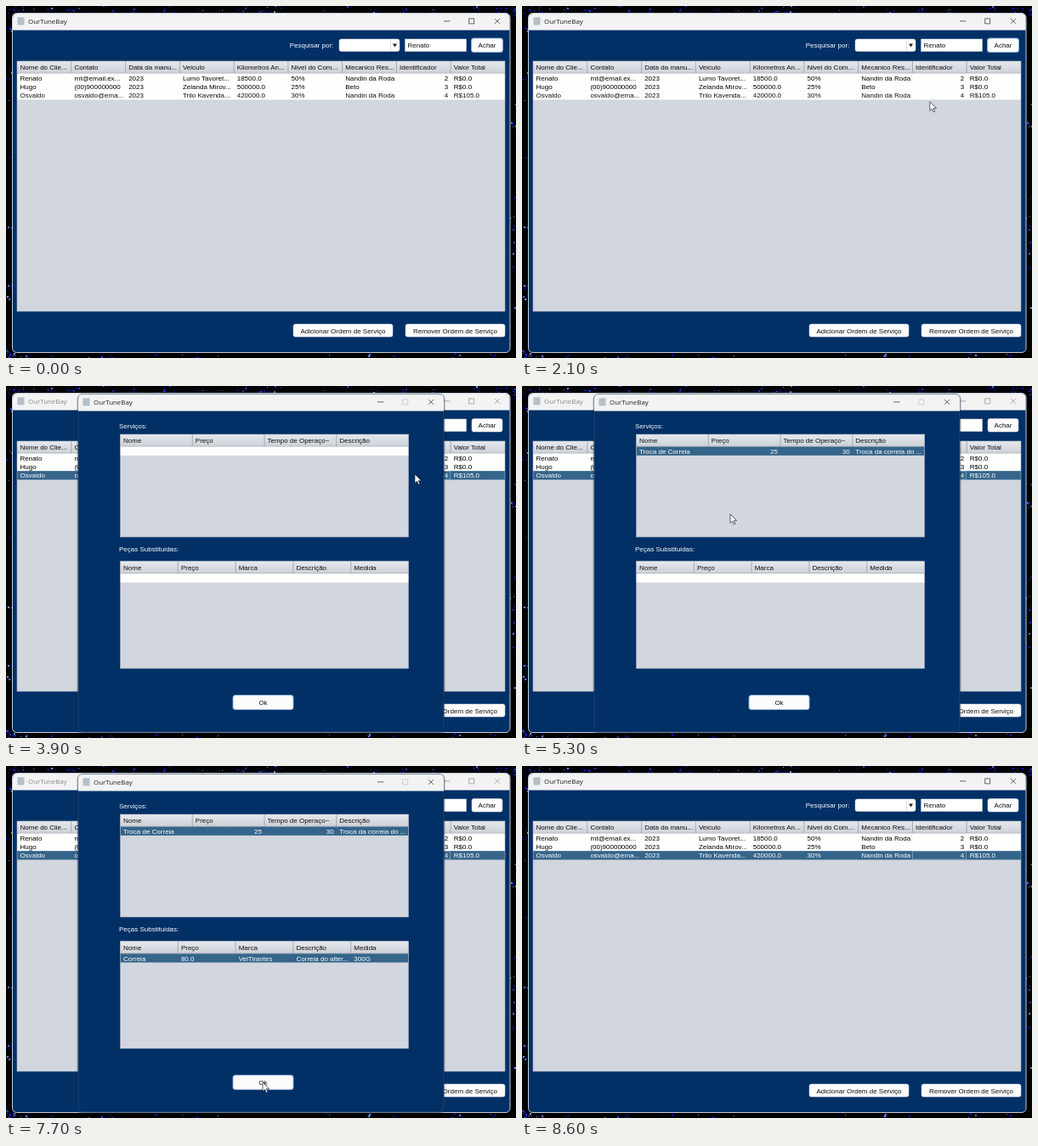
An HTML page that plays this animation: 600 by 415 pixels, repeating every 8700 ms.

```html
<!DOCTYPE html>
<html lang="pt">
<head>
<meta charset="utf-8">
<style>
html, body { margin: 0; width: 100%; height: 100%; overflow: hidden; background: #000; }
svg { display: block; width: 100vw; height: 100vh; }
text { font: 8px "Liberation Sans", Arial, sans-serif; white-space: pre; }
.title { font: 7.9px "Open Sans", sans-serif; }
</style>
</head>
<body>
<svg id="stage" viewBox="0 0 600 415">
  <defs>
    <linearGradient id="head" x2="0" y2="1">
      <stop offset="0" stop-color="#e6e9ed"/>
      <stop offset=".5" stop-color="#d9dce2"/>
      <stop offset="1" stop-color="#cdd1d9"/>
    </linearGradient>
  </defs>
</svg>
<script>
const LOOP = 8700, STEP = 100;
const NAVY = '#003066', GREY = '#d2d6de', PICK = '#35658a', EDGE = 'stroke="#d5dbe3" stroke-width=".5"';
const APP = 'OurTuneBay';
const T = { select: 2500, open: 3500, opened: 3800, service: 4900, part: 5800, close: 7850, closed: 8200 };

const stage = document.getElementById('stage');
const $ = id => document.getElementById(id);
const lerp = (a, b, k) => a + (b - a) * k;
const ramp = (t, a, b) => Math.min(1, Math.max(0, (t - a) / (b - a)));
const smooth = k => k * k * (3 - 2 * k);

const rect = (x, y, w, h, fill, extra = '') =>
  `<rect x="${x}" y="${y}" width="${w}" height="${h}" fill="${fill}" ${extra}/>`;
const text = (x, y, s, fill = '#111', extra = '') =>
  `<text x="${x}" y="${y}" ${fill && `fill="${fill}"`} ${extra}>${s}</text>`;
const line = (d, color, width = .7) =>
  `<path d="${d}" fill="none" stroke="${color}" stroke-width="${width}"/>`;

function button(x, y, w, h, label, id = '') {
  return (id && rect(x - 1, y - 1, w + 2, h + 2, '#78a5d0', `rx="3.5" id="${id}"`)) +
    rect(x, y, w, h, '#fcfcfd', `rx="2.5" ${EDGE}`) +
    text(x + w / 2, y + h / 2 + 3, label, '#111', 'text-anchor="middle"');
}

// Title bar with icon, caption and the three window buttons
function titleBar(x, y, w, h, [min, max, close], id, maxColor) {
  const m = y + h / 2 - .9;
  return `<path d="M${x} ${y + h}v${5 - h}q0-5 5-5h${w - 10}q5 0 5 5v${h - 5}z" fill="#f3f3f4"/>` +
    rect(x + 5.5, m - 4.5, 8, 9, '#b4bfca') +
    `<g id="${id}">` + text(x + 18, m + 3, APP, '#222', 'class="title"') +
    line(`M${min - 3.7} ${m}h7.4`, '#222') +
    line(`M${max - 3} ${m - 3}h6v6h-6z`, maxColor) +
    line(`M${close - 3} ${m - 3}l6 6m0-6l-6 6`, '#222') + '</g>';
}

function table(x, y, w, h, headers, rows, opt) {
  const cw = w / headers.length, top = y + 14.6, rh = 10.3;
  let s = rect(x, y, w, h, GREY) + rect(x, y, w, 14.2, 'url(#head)');
  headers.forEach((label, i) => {
    s += text(x + i * cw + 3.6, y + 10.2, label);
    if (i) s += line(`M${x + i * cw} ${y}v14.2`, '#8f97a4');
  });
  s += line(`M${x} ${y + 14.2}h${w}`, '#9aa2ae');
  rows.forEach((cells, r) => {
    const ry = top + r * rh;
    s += rect(x, ry, w, rh, '#fff', `id="${opt.id}bg${r}"`) + `<g id="${opt.id}tx${r}">`;
    cells.forEach((c, i) => {
      const right = opt.right.includes(i);
      s += text(x + (right ? (i + 1) * cw - 3 : i * cw + 3.6), ry + 8.2, c, '',
        right ? 'text-anchor="end"' : '');
    });
    s += '</g>';
  });
  return s + rect(x, y, w, h, 'none', 'stroke="#aab3c0" stroke-width=".6"');
}

// Wallpaper: blue specks in small clusters around the window
let seed = 77;
const rnd = () => (seed = (seed * 16807) % 2147483647) / 2147483647;
const blues = ['#0b0b9c', '#1414d8', '#2a3cff', '#0a1a7a', '#6f9bff'];
const stars = [];
for (let i = 0; i < 100; i++) {
  const side = rnd(), a = rnd(), b = rnd() * 8;
  const [x, y] = side < .34 ? [a * 600, b] : side < .7 ? [a * a * 600, 408 + b]
    : side < .85 ? [b, a * 415] : [593 + b, a * 415];
  for (let n = 1 + rnd() * 3; n > 0; n--) {
    stars.push({ x: Math.round(x + rnd() * 8 - 4), y: Math.round(y + rnd() * 6 - 3),
      s: rnd() < .6 ? 1 : 2, c: blues[Math.floor(rnd() * 5)], p: rnd() * 6.28, n: 1 + Math.floor(rnd() * 3) });
  }
}
const sky = stars.map(s => rect(s.x, s.y, s.s, s.s, s.c)).join('');

const clients = [
  ['Renato', 'rnt@email.ex...', '2023', 'Lumo Tavoret...', '18500.0', '50%', 'Nandin da Roda', '2', 'R$0.0'],
  ['Hugo', '(00)900000000', '2023', 'Zelanda Mirov...', '500000.0', '25%', 'Beto', '3', 'R$0.0'],
  ['Osvaldo', 'osvaldo@ema...', '2023', 'Trilo Kavenda...', '420000.0', '30%', 'Nandin da Roda', '4', 'R$105.0']
];

const mainWin =
  rect(7.5, 8.5, 585.5, 400, NAVY, 'rx="5" stroke="#c3cedb" stroke-width="1"') +
  titleBar(8, 9, 584.5, 19.5, [518.7, 547.7, 578], 'mainTitle', '#222') +
  text(333.7, 49, 'Pesquisar por:', '#fff') +
  rect(392, 39, 71, 14.5, '#fff', `rx="2.5" ${EDGE}`) +
  line('M452.5 39.5v13.5', '#c8ced8') + '<path d="M455 44.5h5l-2.5 4z" fill="#222"/>' +
  rect(469.5, 39, 72, 14.5, '#fff', EDGE) +
  text(472.5, 49, 'Renato') +
  button(548, 38.5, 36, 15.5, 'Achar', 'findGlow') +
  table(13, 65, 574, 295,
    ['Nome do Clie...', 'Contato', 'Data da manu...', 'Veiculo', 'Kilometros An...', 'Nivel do Com...',
      'Mecanico Res...', 'Identificador', 'Valor Total'],
    clients, { id: 'c', right: [7] }) +
  rect(459.5, 100.5, 63, 9.5, 'none', 'id="cell" stroke="#86a9c4" stroke-width=".7"') +
  button(338, 375, 117, 15, 'Adicionar Ordem de Serviço') +
  button(470, 375, 117, 15, 'Remover Ordem de Serviço');

const dialog =
  rect(83.5, 9, 433, 401, '#001838', 'rx="6" opacity=".3"') +
  rect(85, 10, 430, 398, NAVY, 'rx="5" stroke="#35506f" stroke-width=".7"') +
  titleBar(85, 10, 430, 19.5, [440.7, 469.7, 500], 'dlgTitle', '#b9bec5') +
  text(133, 50, 'Serviços:', '#fff') +
  table(134.5, 57, 339, 121, ['Nome', 'Preço', 'Tempo de Operaço~', 'Descrição'],
    [['Troca de Correia', '25', '30', 'Troca da correia do ...']], { id: 's', right: [1, 2] }) +
  text(133, 195, 'Peças Substituidas:', '#fff') +
  table(134.5, 206.7, 339, 126.3, ['Nome', 'Preço', 'Marca', 'Descrição', 'Medida'],
    [['Correia', '80.0', 'VelTirantes', 'Correia do alter...', '300G']], { id: 'p', right: [] }) +
  button(267.5, 365, 70, 16, 'Ok', 'okGlow');

stage.insertAdjacentHTML('beforeend',
  `<rect width="600" height="415"/><g id="sky">${sky}</g>${mainWin}<g id="dlg">${dialog}</g>` +
  `<path id="mouse" d="M0 0v10.6l2.5-2.3 1.7 3.9 1.7-.8-1.7-3.7h3.4z" fill="#fff" stroke="#222" stroke-width=".7"/>`);
const specks = [...$('sky').children];

// Pointer stops: time, x, y
const path = [
  [1200, 440, 420], [2200, 481, 104], [4100, 481, 104], [4700, 250, 76], [5000, 250, 76],
  [5600, 240, 226], [5900, 240, 226], [6600, 299, 390], [7000, 299, 390],
  [7500, 302, 373], [8100, 302, 373], [8500, 310, 420]
];

function pointer(t) {
  const i = path.findIndex(p => p[0] > t);
  if (i < 1) return path[i ? path.length - 1 : 0].slice(1);
  const a = path[i - 1], b = path[i], k = smooth(ramp(t, a[0], b[0]));
  return [lerp(a[1], b[1], k), lerp(a[2], b[2], k)];
}

function pick(table, row, on) {
  $(`${table}bg${row}`).setAttribute('fill', on ? PICK : '#fff');
  $(`${table}tx${row}`).setAttribute('fill', on ? '#fff' : '#111');
}
const show = (id, k) => $(id).setAttribute('opacity', +k);

function draw(t) {
  specks.forEach((el, i) => {
    const { p, n } = stars[i];
    el.setAttribute('opacity', (.85 + .15 * Math.sin(p + t / LOOP * 6.2832 * n)).toFixed(2));
  });

  const chosen = t >= T.select;
  pick('c', 2, chosen);
  show('cell', chosen);
  show('findGlow', !chosen);
  show('mainTitle', t >= T.open && t < T.close ? .5 : 1);

  // Rows of the dialog fill in once clicked
  for (const [id, at] of [['s', T.service], ['p', T.part]]) {
    pick(id, 0, t >= at);
    show(id + 'tx0', t >= at);
  }

  const shown = smooth(ramp(t, T.open, T.opened)), gone = ramp(t, T.close, T.closed);
  const scale = lerp(.9, 1, shown) - .105 * gone;
  show('dlg', shown * Math.max(0, 1 - 1.25 * gone));
  $('dlg').setAttribute('transform',
    `translate(${300 - 4 * gone} ${209 - 2 * gone}) scale(${scale}) translate(-300 -209)`);

  $('mouse').setAttribute('transform', `translate(${pointer(t)})`);
}

const start = performance.now();
function tick(now) {
  const t = Math.max(0, now - start) % LOOP;
  draw(Math.floor(t / STEP) * STEP);
  requestAnimationFrame(tick);
}
draw(0);
requestAnimationFrame(tick);
</script>
</body>
</html>
```
